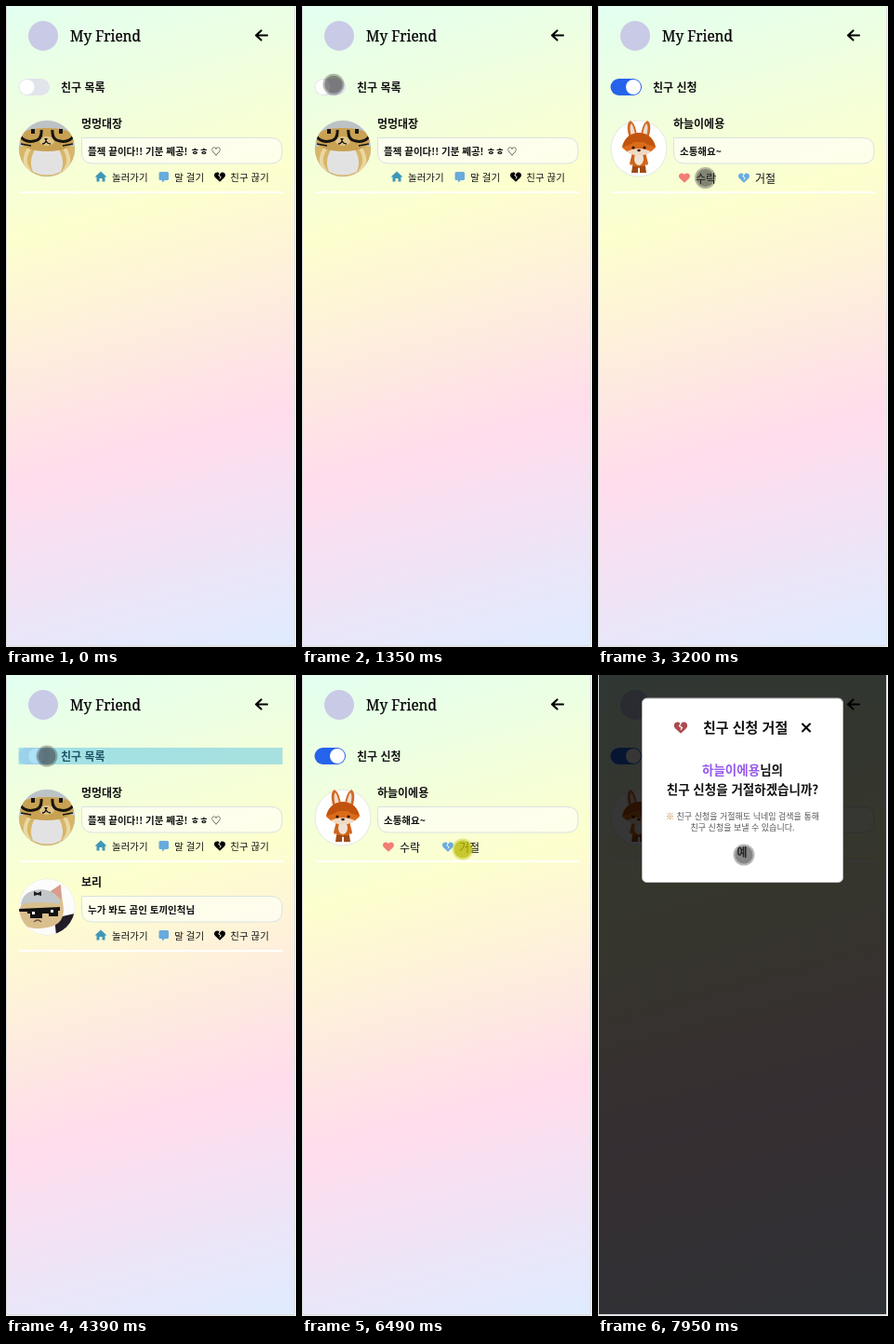
Write an HTML page that moves like this. It is 312 px wide and 688 px high and loops after 8 s.

```html
<!DOCTYPE html>
<html lang="ko">
<head>
<meta charset="utf-8">
<style>
html, body { margin: 0; width: 100%; height: 100%; overflow: hidden; background: #fff; }
#page { position: absolute; left: 1px; top: 0; width: 309px; height: 686px; box-shadow: 0 0 0 1px #dcdfe0, 0 1px 2px #bbb;
  background: linear-gradient(165deg, #e2fff0, #fdffce 33%, #ffdcec 67%, #dfebff); }
svg { position: absolute; left: 0; top: 0; }
text { font: 12px "Noto Sans CJK KR", "Noto Sans CJK", "Noto Sans", sans-serif; fill: #111; }
.title { font: 15.4px "Noto Serif", serif; fill: #000; stroke: #000; stroke-width: .25px; }
.name { font-weight: 700; }
.msg { font-size: 10.5px; font-weight: 700; }
.small { font-size: 10.5px; }
.mid { text-anchor: middle; }
.ask { font-size: 13.5px; font-weight: 700; }
.note { font-size: 9px; fill: #555; }
</style>
</head>
<body>
<div id="page"></div>
<svg width="312" height="688" viewBox="0 0 312 688">
  <defs>
    <path id="heart" d="M0 5.2L-5 .6C-8-3-3.400-7.200 0-3.500C3.400-7.200 8-3 5 .6Z"/>
    <path id="crack" d="M.5-4.500L-1.200-1.500L1.200 0L0 2" fill="none" stroke-width="1"/>
    <clipPath id="round"><circle r="30"/></clipPath>

    <g id="cat" clip-path="url(#round)">
      <rect x="-30" y="-30" width="60" height="60" fill="#bcc3c6"/>
      <path d="M-30-2Q0-8 30-2V30H-30Z" fill="#d8b668"/>
      <path d="M-19 0Q-28 14-18 25M19 0Q28 14 18 25" fill="none" stroke="#ead8a2" stroke-width="4"/>
      <path d="M-13 1H13Q20 14 15 25Q0 32-15 25Q-20 14-13 1Z" fill="#e3e2e3"/>
      <path d="M-30-12Q-24-23 0-22Q24-23 30-12Q28 3 0 3Q-28 3-30-12Z" fill="#c8a152"/>
      <ellipse cy="-8" rx="8" ry="5" fill="#dfc486"/>
      <g fill="none" stroke="#161410" stroke-width="3">
        <path d="M-29-14Q-24-6-14-8Q-5-9-6-20M29-14Q24-6 14-8Q5-9 6-20"/>
        <path d="M-5-5Q-2-5-1-8Q1-5 4-5M-28-5L-17-3M28-5L17-3" stroke-width="1.300"/>
      </g>
      <path d="M-17-21h4v5h-4zM13-21h4v5h-4zM-3-11h4l-2 3z" fill="#161410"/>
    </g>

    <g id="cool" clip-path="url(#round)">
      <rect x="-30" y="-30" width="60" height="60" fill="#fcfcfa"/>
      <path d="M8 12L30 7V30H10Z" fill="#211c26"/>
      <path d="M-30 4L-24-12L4-17L14-24L17-5Q21 14 8 20Q-8 26-22 21Q-30 14-30 4Z" fill="#d9bf8c"/>
      <path d="M4-17L15-24L16-8Z" fill="#d99d8d"/>
      <path d="M-28-3Q-26-18-6-19Q13-17 14-3Q-6-7-28-3Z" fill="#c3c7ca"/>
      <path d="M-14-17l4 2 4-2v5l-4-1-4 1z" fill="#222"/>
      <path d="M-30 2L14 0V4H12V10H2V7H-5V12H-18V7H-21V5H-30Z" fill="#111"/>
      <path d="M-16 5h3v3h-3zM4 3h3v3h-3z" fill="#fff"/>
      <path d="M-14 16Q-10 12-6 16" fill="none" stroke="#654" stroke-width="1.200"/>
    </g>

    <g id="fox">
      <path d="M-10-10Q-15-27-9-30Q-3-26-2-12M10-10Q15-27 9-30Q3-26 2-12" fill="#cf6a28"/>
      <path d="M-8-13Q-11-24-8-27Q-5-22-4-14M8-13Q11-24 8-27Q5-22 4-14" fill="#efdccb"/>
      <path d="M-7 4H7L10 16Q8 20 7 16V26H1V21H-1V26H-7V16Q-8 20-10 16Z" fill="#cf641c"/>
      <ellipse cy="11" rx="5" ry="7" fill="#f0e3d6"/>
      <path d="M-7 19h6v7h-7zM7 19H1v7h7z" fill="#a04a17"/>
      <path d="M-18-1Q-15-16 0-17Q15-16 18-1Q10 7 0 7Q-10 7-18-1Z" fill="#dc6b1a"/>
      <path d="M-13 3Q-6 0 0 0Q6 0 13 3Q7 8 0 7Q-7 8-13 3Z" fill="#f2d9c2"/>
      <path d="M-18-2Q-14-16 0-17Q14-16 18-2Q10-3 5-7H-5Q-10-3-18-2Z" fill="#c2530f"/>
      <g fill="#23150f"><circle cx="-6" cy="-1" r="1.600"/><circle cx="6" cy="-1" r="1.600"/><ellipse cy="2" rx="1.800" ry="1.200"/></g>
    </g>
  </defs>

  <circle cx="40" cy="32" r="16" fill="#c9cbe6"/>
  <text class="title" x="69" y="38">My Friend</text>
  <path d="M281 31.500H269M274.500 26.500L269 31.500L274.500 36.500" fill="none" stroke="#000" stroke-width="2.200" stroke-linecap="round" stroke-linejoin="round"/>

  <rect id="track" x="13.500" y="78" width="33.500" height="18" rx="9"/>
  <circle id="knob" cy="87" r="8" fill="#fff"/>
  <text id="label" class="name" x="59" y="91.500"></text>
  <g id="rows"></g>
  <rect id="tap" x="13.500" y="78" width="284" height="18" fill="#33b5e5" opacity=".4"/>

  <g id="modal">
    <rect x="1" width="309" height="686" opacity=".79"/>
    <rect x="47.500" y="25" width="216" height="197.500" rx="5" fill="#fff" stroke="#bbb"/>
    <g transform="translate(89 56.500) scale(1.200)" stroke="#fff"><use href="#heart" fill="#ac4a50" stroke="none"/><use href="#crack"/></g>
    <text x="113" y="61.500" style="font-size:15px;font-weight:700">친구 신청 거절</text>
    <path d="M220 52.500l8 8m0-8l-8 8" stroke="#000" stroke-width="2" stroke-linecap="round"/>
    <text class="ask mid" x="155.500" y="107"><tspan fill="#9557ee">하늘이에용</tspan>님의</text>
    <text class="ask mid" x="155.500" y="128">친구 신청을 거절하겠습니까?</text>
    <text class="note mid" x="155.500" y="155"><tspan fill="#c27a2c">※</tspan> 친구 신청을 거절해도 닉네임 검색을 통해</text>
    <text class="note mid" x="155.500" y="167">친구 신청을 보낼 수 있습니다.</text>
    <text class="mid name" x="155" y="195">예</text>
  </g>
  <g id="cursor"><circle r="11.500" opacity=".35"/><circle r="9.500" opacity=".38"/></g>
</svg>
<script>
const $ = id => document.getElementById(id);
const show = (el, on) => el.setAttribute('display', on ? 'inline' : 'none');

const icon = (x, y, color, broken) => `<g transform="translate(${x} ${y})"><use href="#heart" fill="${color}"/>
  ${broken ? '<use href="#crack" stroke="#feffdc"/>' : ''}</g>`;
const friendActions = `
  <path d="M102 177.500L95.500 183.500H97.500V188.500H100.500V185H103.500V188.500H106.500V183.500H108.500Z" fill="#3e98b8"/>
  <path d="M166 178H173.500Q175 178 175 179.500V185.500Q175 187 173.500 187H171L168 189.500V187H166Q164.500 187 164.500 185.500V179.500Q164.500 178 166 178Z" fill="#68abdc"/>
  ${icon(230, 183.5, '#000', true)}
  <text class="small" x="114" y="188">놀러가기</text><text class="small" x="181.200" y="188">말 걸기</text><text class="small" x="241.300" y="188">친구 끊기</text>`;
const requestActions = icon(93, 184.5, '#f17d75') + icon(157, 184.5, '#68abe4', true) +
  '<text x="105" y="189.500">수락</text><text x="169" y="189.500">거절</text>';

function row(name, msg, avatar, actions) {
  const g = document.createElementNS('http://www.w3.org/2000/svg', 'g');
  g.innerHTML = `<circle cx="44" cy="153" r="30" fill="#fff" stroke="#e6e8e0"/>
    <use href="#${avatar}" x="44" y="153"/>
    <text class="name" x="81" y="130.500">${name}</text>
    <path d="M81.500 141.500H285Q297 141.500 297 153V157Q297 169 285 169H93Q81.500 169 81.500 157Z" fill="#fffff4" fill-opacity=".75" stroke="#d9e3e1"/>
    <text class="msg" x="88" y="160">${msg}</text>${actions}
    <path d="M14 200H298" stroke="#fff" stroke-width="2"/>`;
  $('rows').append(g);
  return (on, slot) => { show(g, on); g.setAttribute('transform', `translate(0 ${slot * 96})`); };
}

const bearMsg = '누가 봐도 곰인 토끼인척님';
const catRow = row('멍멍대장', '플젝 끝이다!! 기분 쩨공! ㅎㅎ ♡', 'cat', friendActions);
const newRow = row('보리', bearMsg, 'cool', friendActions);
const coolRow = row('보리', bearMsg, 'cool', requestActions);
const foxRow = row('하늘이에용', '소통해요~', 'fox', requestActions);

// time, x, y
const path = [
  [200, 228, 582], [800, 44, 36], [950, 43, 62], [1150, 34, 84], [1750, 34, 85], [2020, 76.5, 78],
  [2290, 132, 155], [2680, 115, 193], [2960, 115.5, 184.5], [3530, 115.5, 184.5], [3800, 44, 80], [4200, 44, 81],
  [4260, 44, 87], [5540, 44, 88], [5700, 60, 81], [6070, 165, 175], [6200, 173, 187], [6950, 173, 187],
  [7280, 144, 202], [7610, 144, 202], [7900, 157, 193]];
const flips = [1620, 4330, 5440];
const SLIDE = 150;

const ease = k => k * k * (3 - 2 * k);

function cursorAt(t) {
  const i = path.findIndex(p => p[0] > t);
  if (i < 0) return path.at(-1).slice(1);
  const [t0, x0, y0] = path[Math.max(i - 1, 0)], [t1, x1, y1] = path[i];
  const e = ease(Math.max(0, (t - t0) / (t1 - t0)));
  return [x0 + (x1 - x0) * e, y0 + (y1 - y0) * e];
}

function draw(t) {
  const past = flips.filter(f => f <= t), on = past.length % 2 === 1;
  const e = past.length ? ease(Math.min(1, (t - past.at(-1)) / SLIDE)) : 1;
  $('knob').setAttribute('cx', 22.5 + 15.5 * (on ? e : 1 - e));
  $('track').setAttribute('fill', on ? '#2563eb' : '#e2e4ec');
  $('label').textContent = on ? '친구 신청' : '친구 목록';

  const accepted = t >= 3170;
  catRow(!on, 0);
  newRow(!on && accepted, 1);
  coolRow(on && !accepted, 0);
  foxRow(on, accepted ? 0 : 1);

  show($('tap'), flips.some(f => t >= f - 70 && t < f + 130));
  show($('modal'), t >= 6620);
  show($('cursor'), t >= 200);
  $('cursor').setAttribute('transform', `translate(${cursorAt(t)})`);
  const pressed = t >= 6490 && t < 6620;
  $('cursor').setAttribute('fill', pressed ? '#b8b800' : '#333');
  $('cursor').lastElementChild.setAttribute('opacity', pressed ? .65 : .38);
}

const start = performance.now();
function tick() {
  draw((performance.now() - start) % 8000);
  requestAnimationFrame(tick);
}
tick();
</script>
</body>
</html>
```
